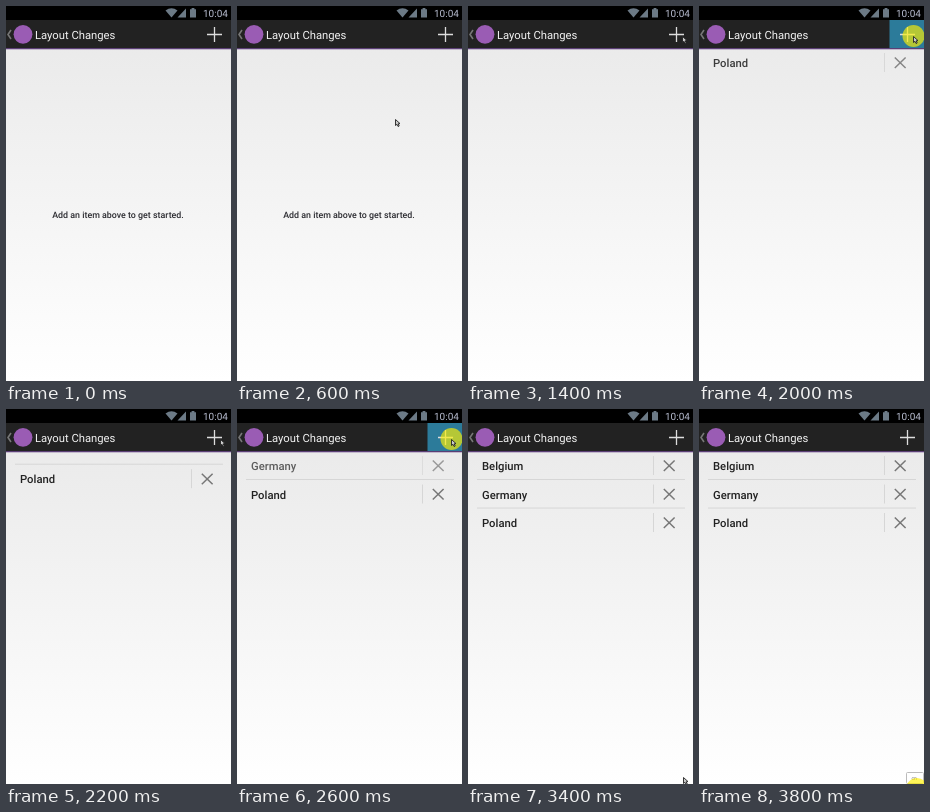
An HTML page for the animation above (4 s loop, 225x375 px).

```html
<!DOCTYPE html>
<html lang="en">
<head>
<meta charset="utf-8">
<title>Layout Changes</title>
<style>
  html, body { margin: 0; width: 100%; height: 100%; overflow: hidden; background: #fff; }
  svg { display: block; width: 100%; height: 100%; }
  text { font-family: Roboto, sans-serif; text-rendering: geometricPrecision; }
  .item { font-size: 11.25px; font-weight: 500; fill: #222; }
</style>
</head>
<body>
<svg viewBox="0 0 225 375">
  <defs>
    <linearGradient id="page" x2="0" y2="1">
      <stop stop-color="#e8e8e8"/>
      <stop offset="1" stop-color="#fff"/>
    </linearGradient>
  </defs>
  <rect width="225" height="375" fill="url(#page)"/>
  <text id="empty" x="112" y="212" text-anchor="middle" font-size="8.85" font-weight="500" fill="#2b2b30">Add an item above to get started.</text>
  <g id="list"></g>

  <!-- status bar -->
  <rect width="225" height="14" fill="#000"/>
  <g fill="#6c7a86">
    <path d="M159.5 4.5Q165.5 0 171.5 4.5L165.5 11.5Z"/>
    <path d="M180 2.5V11.5H171.5Z"/>
    <path d="M184 3.2H185.6V2H188.4V3.2H190V11.5H184Z"/>
  </g>
  <text x="197" y="11" font-size="10" fill="#b8bdd0">10:04</text>

  <!-- action bar -->
  <rect y="14" width="225" height="28" fill="#222"/>
  <rect y="42" width="225" height="1" fill="#5b3f75"/>
  <rect y="43" width="225" height="1" fill="#785a96" opacity=".35"/>
  <path d="M5 24L2 28.5L5 33" fill="none" stroke="#777" stroke-width="1.6"/>
  <circle cx="17" cy="28.3" r="9.4" fill="#9a5cb4"/>
  <text x="29" y="32.5" font-size="11.25" fill="#f3f3f3">Layout Changes</text>
  <rect id="pressed" x="190.5" y="14" width="34.5" height="28" fill="#2c7b9a"/>
  <path d="M201 28.5H216M208.5 21V36" stroke="#ddd" stroke-width="1.3"/>

  <g id="tooltip">
    <rect x="207.5" y="363.5" width="17" height="11" rx="1" fill="#fff" stroke="#bbb"/>
    <text x="212.5" y="370.5" font-size="5" fill="#666">cn</text>
  </g>
  <circle id="touch" r="11" fill="#fff000" opacity=".65"/>
  <path id="cursor" d="M.5 .5V6.5L2 5.3L3.2 7.6L4.2 7L3.2 4.8L5 4.6Z" fill="#ccc" stroke="#222" stroke-width=".9"/>
</svg>
<script>
const LOOP = 4000, STEP = 200, ROW_HEIGHT = 28.5;
const rows = [
  { name: "Poland", fadeAt: 1740 },
  { name: "Germany", fadeAt: 2390, pushAt: 2120 },
  { name: "Belgium", fadeAt: 3080, pushAt: 2730 }
];
// Cursor position from each time on; null hides it.
const cursorStops = [
  [0, null], [200, [159, 263]], [400, [148, 236]], [600, [158, 113]], [800, [212, 49]],
  [1000, [217, 38]], [1200, [214, 30]], [3000, [209, 96]], [3200, [213, 337]],
  [3400, [215, 368]], [3600, null]
];
const pressTimes = [1200, 2000, 2600];

const el = id => document.getElementById(id);
const show = (node, on) => node.style.display = on ? "" : "none";
const move = (node, x, y) => node.setAttribute("transform", `translate(${x} ${y})`);
const progress = (t, start) => Math.min(1, Math.max(0, (t - start) / 300));
const decelerate = p => 1 - (1 - p) ** 2;

el("list").innerHTML = rows.map((row, i) => `
  <g id="row${i}">
    ${i ? '<path d="M9 70.5H217" stroke="#d6d6d6"/>' : ""}
    <g id="content${i}">
      <text class="item" x="14" y="61">${row.name}</text>
      <path d="M185.5 47V66" stroke="#d6d6d6"/>
      <path d="M195.8 51.5L206.6 62M206.6 51.5L195.8 62" stroke="#777" stroke-width="1.5"/>
    </g>
  </g>`).join("");

function draw(t) {
  let offset = 0;
  for (let i = rows.length - 1; i >= 0; i--) {
    const { fadeAt, pushAt = 0 } = rows[i];
    const push = decelerate(progress(t, pushAt));
    // A new row's divider travels with the rows it pushes down.
    const y = offset - (1 - push) * ROW_HEIGHT;
    move(el("row" + i), 0, y);
    show(el("row" + i), t >= pushAt);
    el("content" + i).setAttribute("opacity", progress(t, fadeAt));
    offset += push * ROW_HEIGHT;
  }

  const pressed = pressTimes.includes(t), tooltip = t >= 3800;
  show(el("empty"), t < 1400);
  show(el("pressed"), pressed);
  show(el("tooltip"), tooltip);
  show(el("touch"), pressed || tooltip);
  move(el("touch"), ...(tooltip ? [218, 380] : [214.5, 30]));

  const at = cursorStops.filter(([start]) => start <= t).pop()[1];
  show(el("cursor"), at);
  if (at) move(el("cursor"), ...at);
}

const begin = performance.now();
function tick() {
  const t = (performance.now() - begin) % LOOP;
  draw(Math.floor(t / STEP) * STEP);
  requestAnimationFrame(tick);
}
tick();
</script>
</body>
</html>
```
